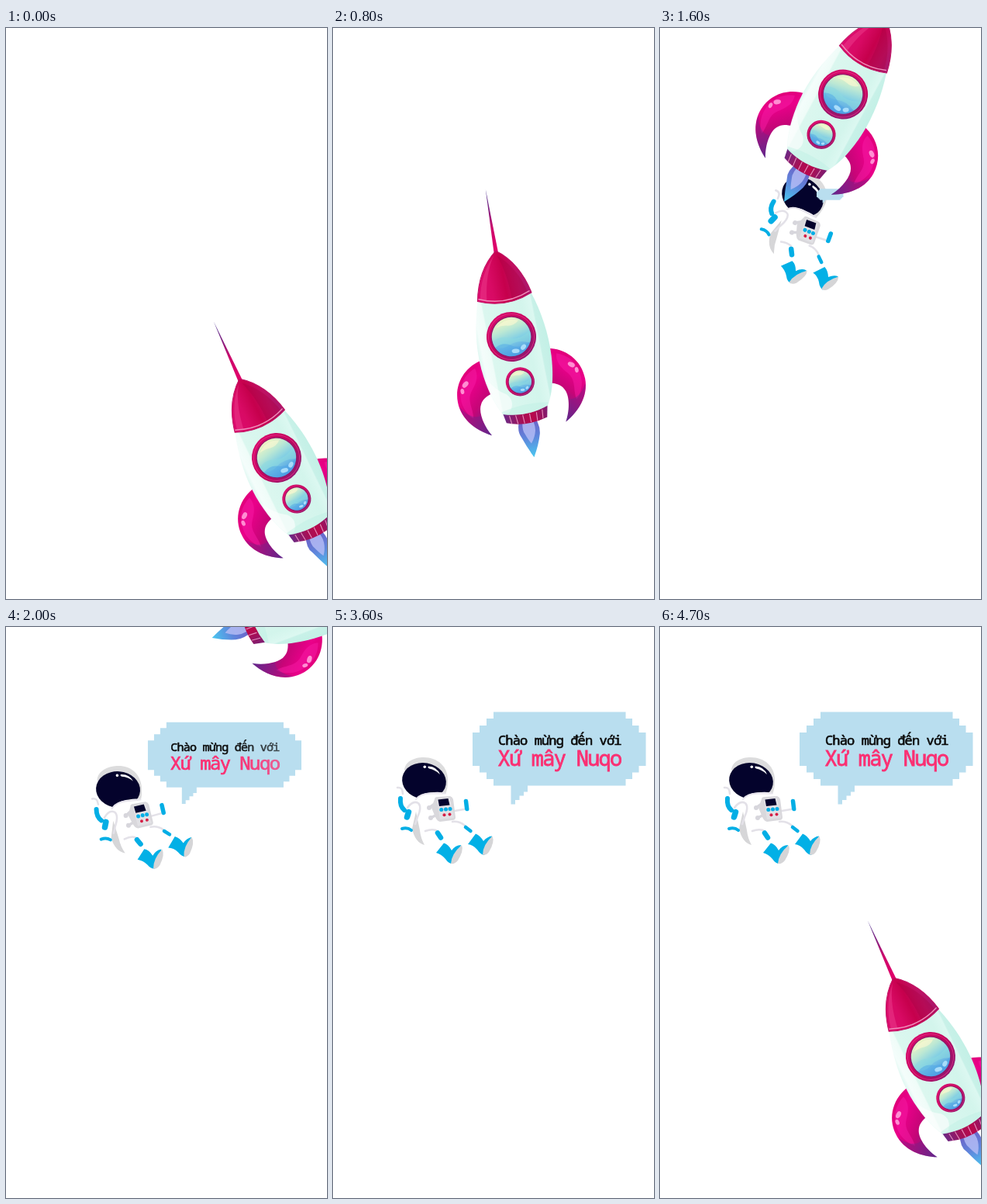
An HTML page that plays this animation: 414x736 px, repeating every 4800 ms.

```html
<!DOCTYPE html>
<html lang="vi">
<head>
<meta charset="utf-8">
<title>Rocket greeting</title>
<style>
  html, body { margin: 0; width: 100%; height: 100%; overflow: hidden; background: #fff; }
  svg { display: block; width: 100%; height: 100%; }
  text { font-family: "Noto Sans Mono", "DejaVu Sans Mono", monospace; white-space: pre; }
  #line1 { font-size: 17px; letter-spacing: -.88px; fill: #0c0c0c; stroke: #0c0c0c; stroke-width: .65px; }
  #line2 { font-size: 27px; letter-spacing: -1.75px; fill: #fb2f72; stroke: #fb2f72; stroke-width: .8px; }
  .line { fill: none; stroke-linecap: round; }
</style>
</head>
<body>
<svg viewBox="0 0 414 736">
  <defs>
    <linearGradient id="hull">
      <stop offset="0" stop-color="#e0f8f2"/><stop offset=".06" stop-color="#f4fdfb"/>
      <stop offset=".17" stop-color="#effcf8"/><stop offset=".19" stop-color="#dbf7ef"/>
      <stop offset=".72" stop-color="#d3f5ec"/><stop offset=".86" stop-color="#dcf8f1"/>
      <stop offset=".88" stop-color="#c8f1e8"/><stop offset="1" stop-color="#c3f0e6"/>
    </linearGradient>
    <linearGradient id="nose">
      <stop offset="0" stop-color="#dd0b70"/><stop offset=".3" stop-color="#d80a64"/>
      <stop offset=".55" stop-color="#c6004c"/><stop offset=".8" stop-color="#be1263"/>
      <stop offset="1" stop-color="#a5186c"/>
    </linearGradient>
    <linearGradient id="mast" x1="0" y1="1" x2="0" y2="0">
      <stop offset="0" stop-color="#e2006a"/><stop offset=".4" stop-color="#cc0a6c"/>
      <stop offset=".65" stop-color="#8a2080"/><stop offset="1" stop-color="#43308f"/>
    </linearGradient>
    <linearGradient id="fin" x1=".2" y1="0" x2=".65" y2="1">
      <stop offset="0" stop-color="#d8006c"/><stop offset=".35" stop-color="#ea008a"/>
      <stop offset=".62" stop-color="#c60577"/><stop offset="1" stop-color="#572a8c"/>
    </linearGradient>
    <linearGradient id="band">
      <stop offset="0" stop-color="#6a2a86"/><stop offset=".4" stop-color="#a80f55"/>
      <stop offset=".65" stop-color="#b8084c"/><stop offset="1" stop-color="#7a1f74"/>
    </linearGradient>
    <linearGradient id="ring" x1=".2" y1="0" x2=".8" y2="1">
      <stop offset="0" stop-color="#d80a6c"/><stop offset=".5" stop-color="#c2055c"/>
      <stop offset="1" stop-color="#8a1c72"/>
    </linearGradient>
    <linearGradient id="glass" x1=".4" y1="0" x2=".6" y2="1">
      <stop offset="0" stop-color="#f0f6c4"/><stop offset=".3" stop-color="#bce8d4"/>
      <stop offset=".58" stop-color="#82cfe4"/><stop offset="1" stop-color="#4c97e2"/>
    </linearGradient>
    <linearGradient id="flame" x1="0" y1="0" x2="0" y2="1">
      <stop offset="0" stop-color="#6f5cc4"/><stop offset=".5" stop-color="#5f86dc"/>
      <stop offset="1" stop-color="#49c8f0"/>
    </linearGradient>

    <g id="finShape">
      <path fill="url(#fin)" d="M-42 22C-66 26-84 45-84 70C-84 94-66 111-49 120C-58 104-60 86-55 78C-52 72-46 69-38 67Z"/>
      <path fill="#f51aa2" opacity=".55" d="M-54 31C-73 38-81 54-79 74C-76 87-71 92-68 94C-66 78-73 69-62 57C-55 49-51 40-54 31Z"/>
      <path fill="#7b2088" opacity=".45" d="M-83 76C-81 96-66 111-49 120C-57 107-59 99-58 92C-66 95-76 89-83 76Z"/>
      <g fill="#ff8ed2">
        <ellipse cx="-70" cy="49" rx="4.8" ry="3" transform="rotate(-38 -70 49)"/>
        <ellipse cx="-75.5" cy="57" rx="2.4" ry="3.6"/>
      </g>
    </g>

    <g id="port">
      <circle r="32" fill="url(#ring)"/>
      <circle r="29.5" fill="none" stroke="#e8338a" stroke-width="1" opacity=".7"/>
      <circle r="26.5" fill="#8d1a6c"/>
      <circle r="25.2" fill="url(#glass)"/>
      <path fill="#8fdbe0" opacity=".55" d="M-25 2Q-14-5-3 1T25-3Q26 6 22 12Q8 5-4 10T-24 8Z"/>
      <path fill="#4aa2e6" opacity=".45" d="M-23 10Q-12 4-2 11T22 11C17 21 9 25 0 25S-19 20-23 10Z"/>
      <path fill="#fbf9d2" opacity=".65" d="M-17-15Q-3-27 13-19Q6-13-2-15T-17-15Z"/>
      <g fill="#a8dcfa">
        <ellipse cx="2" cy="19" rx="5" ry="2.8" transform="rotate(8 2 19)"/>
        <ellipse cx="12.7" cy="16" rx="4" ry="2.8" transform="rotate(-35 12.7 16)"/>
      </g>
    </g>
  </defs>

  <g id="astronaut">
    <path fill="#dcdcdd" d="M92 184C93 174 104 168 117 168C135 168 148 180 148 197C148 208 146 215 143 219L110 218Z"/>
    <path fill="#d6d6d8" d="M107 238L102 260Q106 278 118 281Q113 272 112 262Z"/>
    <path fill="#fff" d="M108 222Q118 212 146 214L160 248Q170 250 177 260L166 262Q140 254 134 268L118 264Q110 250 108 222Z"/>
    <ellipse cx="117.5" cy="198.5" rx="28.5" ry="23.3" transform="rotate(10 117.5 198.5)" fill="#04032c"/>
    <path fill="#fff" d="M106 224Q113 213 130 213Q140 212 147 215L146 224Z"/>
    <path class="line" stroke="#e7e4ec" stroke-width="2" d="M107 222Q113 214 128 214.5H145"/>
    <circle cx="118.3" cy="180.3" r="1.8" fill="#fff"/>
    <path fill="#fff" d="M123 179.5Q134 180 138 190Q132 184 124 182.5Q121.5 181 123 179.5Z"/>

    <g class="line">
      <path stroke="#e3e1e8" stroke-width="2.5" d="M83 207Q90 206 90 215M96 233Q103 223 110 227Q115 232 109 245L106 254"/>
      <path stroke="#e3e1e8" stroke-width="2.5" d="M157 237L169 235M119 263Q127 260 133 262M154 251Q163 250 170 256"/>
      <path stroke="#02aee5" stroke-width="6" d="M87 221Q86 231 92 236"/>
      <path stroke="#02aee5" stroke-width="7.5" d="M97.5 238.5L95.5 245"/>
      <path stroke="#02aee5" stroke-width="4" d="M89 260Q96 258 101 262"/>
      <path stroke="#02aee5" stroke-width="5.5" d="M171.5 224.5L172.7 234.5"/>
      <path stroke="#02aee5" stroke-width="6.5" d="M135 265.5L139 271.5"/>
      <path stroke="#02aee5" stroke-width="4.5" d="M171 258L177.5 263"/>
      <path stroke="#d7d6dc" stroke-width="3.5" d="M124 233L131 228M126 246L132 243"/>
    </g>
    <g fill="#d7d6dc"><circle cx="124" cy="233" r="3"/><circle cx="126" cy="246" r="3"/></g>

    <path fill="#d9d8dc" d="M131 222Q131 219 135 219L151 218Q154 219 155 222L158 245Q158 249 154 249L138 251Q134 250 132 245L127 233Z"/>
    <path fill="#e2e1e5" d="M134 222L151 220L156 246L138 248Z"/>
    <path fill="#04032c" d="M135.5 222.5L148.5 221L150.5 229.5L137 231Z"/>
    <g fill="#02aee5"><circle cx="139.8" cy="235.5" r="2.5"/><circle cx="145.5" cy="235" r="2.5"/><circle cx="151" cy="234.5" r="2.5"/></g>
    <g fill="#d51f45"><circle cx="143.5" cy="242.2" r="2"/><circle cx="150.5" cy="241.5" r="2"/></g>

    <path fill="#02b0e6" d="M133 291L143 278.5Q149 280 153 288Q158 281 165 281Q162 295 154 305Q149 305 145 299Q140 293 133 291Z"/>
    <path fill="#d5d5d7" d="M166 281Q169 288 161 301Q157 306 152 305Q153 292 166 281Z"/>
    <path fill="#02b0e6" d="M174 280L184 266.5Q190 269 194 276Q199 270 205 269.5Q203 283 195 294Q190 293 186 287Q181 281 174 280Z"/>
    <path fill="#d5d5d7" d="M205.5 269.5Q209 277 201 290Q197 295 193 293.5Q193 281 205.5 269.5Z"/>
  </g>

  <g id="bubble">
    <path fill="#b9deef" d="M207 109.5H377.5V118H386V127H394.5V136H403.5V179H394.5V187.5H386V196H377.5V204.5H251V212.5H246V217.5H240.5V223H235V228.5H229.5V204.5H207V196H198V187.5H189V179H180V136H189V127H198V118H207Z"/>
    <text id="line1" x="213" y="152"></text>
    <text id="line2" x="212.5" y="178.5"></text>
  </g>

  <g id="rocket">
    <path fill="url(#flame)" d="M-10 106Q-17 121-12 130Q-7 145-1 158Q8 143 12 130Q15 119 9 106Z"/>
    <path fill="#b3bbf4" opacity=".85" d="M-6 106Q-10 120-7 126Q-4 135-1 140Q5 133 7 125Q9 117 5 106Z"/>
    <use href="#finShape"/>
    <use href="#finShape" transform="translate(-1 1) scale(-1 1)"/>
    <path fill="url(#band)" d="M-30 94L-27.5 108Q-2 118 25.5 110.5L29 94Z"/>
    <path class="line" stroke="#e58fbd" stroke-width="1.1" d="M-22 100L-21 110M-14 101L-13 111.5M-5 102L-4.5 112.5M4 102L4 112.5M13 102L12.5 112M21 100L20 110.5"/>
    <path fill="url(#hull)" d="M-34 -53C-43 -25-48 5-46 34C-44 60-38 82-30 96Q0 106 29 96C38 82 44 60 46 34C48 5 44-25 36-51Z"/>
    <path fill="#fff" opacity=".6" d="M-44 44Q-34 64-20 72Q-10 84-22 96L-30 95C-38 80-42 62-44 44Z"/>
    <path fill="#b9ede2" opacity=".4" d="M-31 93Q0 86 31 92L29 96Q0 106-30 96Z"/>
    <path fill="url(#mast)" d="M4 -193L4.3 -110H-1.2Z"/>
    <path fill="url(#nose)" stroke="#c01263" stroke-width="1" d="M1.5 -112.5C-17 -99-29 -77-34 -53Q1 -37 36.5 -51C32 -76 20 -99 1.5 -112.5Z"/>
    <path fill="#ef4a95" opacity=".4" d="M-2 -107C-16 -94-26 -76-30 -55L-22 -52C-19 -74-12 -94-2 -107Z"/>
    <path fill="#a3003f" opacity=".35" d="M2 -106C8 -88 11 -68 10 -46Q23 -46 32 -51C28 -72 18 -92 2 -106Z"/>
    <path class="line" stroke="#f08bb9" stroke-width="1.5" d="M-32 -55.5Q1 -40.5 34 -53.5"/>
    <use href="#port"/>
    <use href="#port" transform="translate(0 59) scale(.58)"/>
  </g>
</svg>
<script>
const LOOP = 4800, STEP = 100;
const el = id => document.getElementById(id);

// Rows are [ms, x, y, degrees]
const departure = [
  [0, 349, 554, -26], [600, 267, 462, -16.5], [800, 230, 398, -11.1], [1200, 192, 241, 6.5],
  [1300, 196.5, 198, 10.8], [1800, 303, 20, 46], [2000, 414, -40.5, 69.5], [2400, 700, -110, 95]
];
const arrival = [
  [3500, 640, 700, -56], [3800, 562, 665, -49], [4300, 411, 601, -37], [4700, 349, 554, -26]
];
const drift = [
  [1300, 202, 220, 45], [2000, 144, 209, -6], [2400, 124, 204, -6.5],
  [2800, 119, 202, -5], [3600, 117, 198, 0]
];
const growth = [[1500, 0], [1800, .72], [2000, .886], [2400, .968], [2800, .994], [3600, 1]];

// Smooth curve through uneven keys, at rest at both ends
function follow(keys, t) {
  const last = keys.length - 1;
  if (t <= keys[0][0]) return keys[0].slice(1);
  if (t >= keys[last][0]) return keys[last].slice(1);
  const i = keys.findIndex(k => k[0] > t) - 1;
  const span = n => keys[n + 1][0] - keys[n][0];
  const rate = (n, c) => (keys[n + 1][c] - keys[n][c]) / span(n);
  const slope = (n, c) => n === 0 || n === last ? 0 :
    (span(n) * rate(n - 1, c) + span(n - 1) * rate(n, c)) / (span(n - 1) + span(n));
  const h = span(i), s = (t - keys[i][0]) / h, q = 1 - s;
  return keys[i].slice(1).map((a, j) => {
    const c = j + 1;
    return a * q * q * (1 + 2 * s) + keys[i + 1][c] * s * s * (3 - 2 * s) +
      h * s * q * (slope(i, c) * q - slope(i + 1, c) * s);
  });
}

function letters(id, words) {
  return [...words].map(ch => {
    const span = document.createElementNS("http://www.w3.org/2000/svg", "tspan");
    span.textContent = ch;
    el(id).appendChild(span);
    return span;
  });
}
const lines = [
  { spans: letters("line1", "Chào mừng đến với"), lag: .055 },
  { spans: letters("line2", "Xứ mây Nuqo"), lag: .075 }
];

const show = (id, on) => el(id).setAttribute("visibility", on ? "visible" : "hidden");
const pose = (id, [x, y, deg], after = "") =>
  el(id).setAttribute("transform", `translate(${x} ${y}) rotate(${deg}) ${after}`);

function draw(t) {
  show("rocket", t < 2400 || t >= 3800);
  pose("rocket", follow(t < 3000 ? departure : arrival, t));

  show("astronaut", t >= 1300);
  pose("astronaut", follow(drift, t), "translate(-117 -198)");

  show("bubble", t > 1500);
  const [size] = follow(growth, t);
  el("bubble").setAttribute("transform", `translate(206 225) scale(${size}) translate(-206 -225)`);
  for (const { spans, lag } of lines) {
    spans.forEach((span, i) => {
      const alpha = (t - 1750) / 170 - lag * i;
      span.setAttribute("opacity", 1);
      span.style.fillOpacity = span.style.strokeOpacity = Math.max(0, Math.min(1, alpha));
    });
  }
}

const start = performance.now();
function tick() {
  const t = (performance.now() - start) % LOOP;
  draw(Math.floor(t / STEP) * STEP);
  requestAnimationFrame(tick);
}
tick();
</script>
</body>
</html>
```
